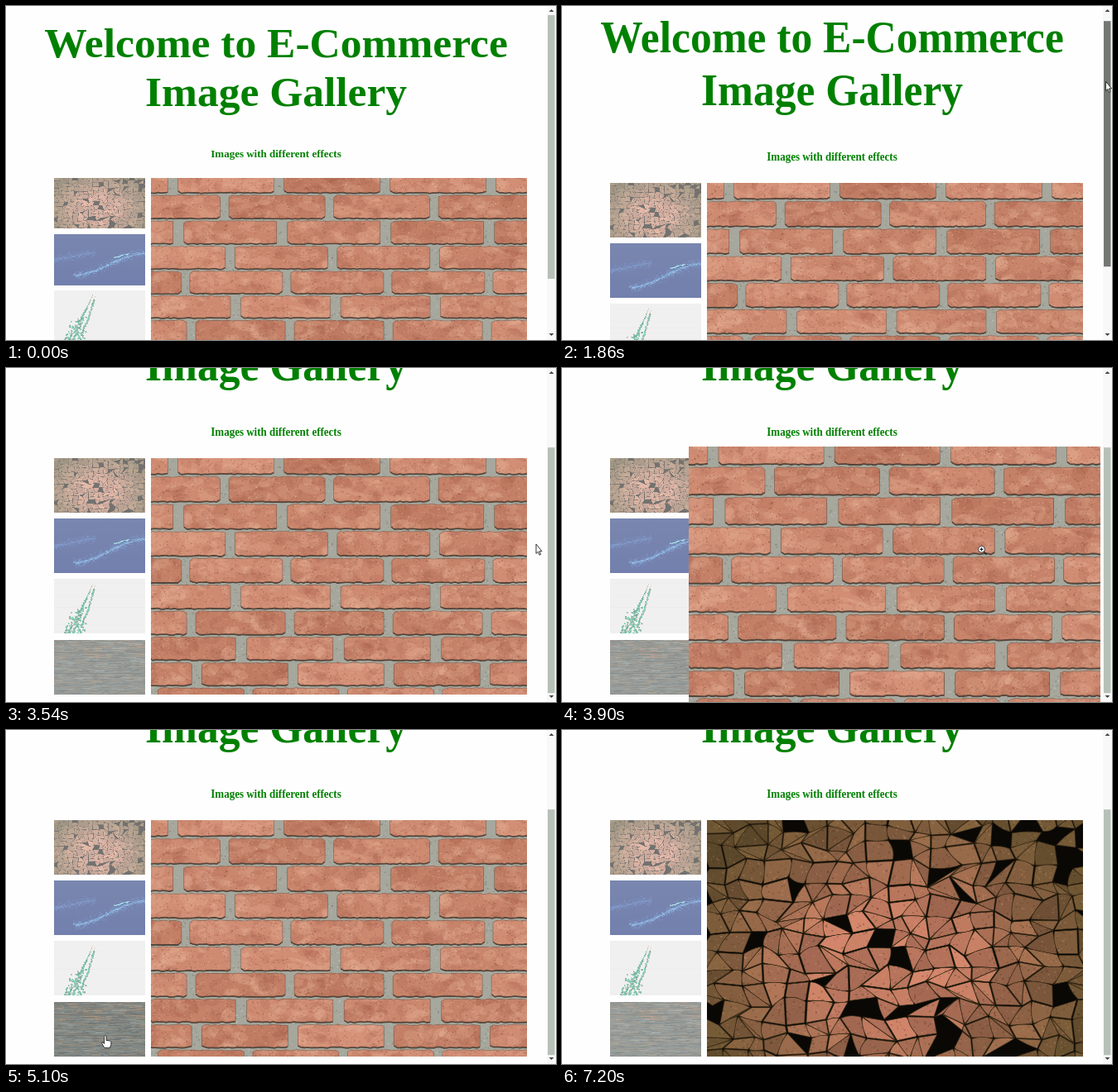
These frames come from a looping animation (664 px wide and 404 px high, 7260 ms). An HTML page with a canvas:

```html
<!DOCTYPE html>
<html lang="en">
<head>
<meta charset="utf-8">
<title>Image Gallery</title>
<style>
html, body { margin: 0; width: 100%; height: 100%; overflow: hidden; background: #fff; }
canvas { display: block; width: 664px; height: 404px; }
</style>
</head>
<body>
<canvas id="stage" width="664" height="404"></canvas>
<script>
const LOOP = 7260, W = 664, H = 404;
const IW = 454, IH = 286;
const ctx = document.getElementById('stage').getContext('2d');
const clamp = v => Math.max(0, Math.min(1, v));
const smooth = u => u * u * (3 - 2 * u);
const ramp = (t, from, ms) => smooth(clamp((t - from) / ms));
const mix = (a, b, u) => a + (b - a) * u;

function random(seed) {
  return () => {
    seed = (seed + 0x6D2B79F5) | 0;
    let n = Math.imul(seed ^ (seed >>> 15), 1 | seed);
    n = (n + Math.imul(n ^ (n >>> 7), 61 | n)) ^ n;
    return ((n ^ (n >>> 14)) >>> 0) / 4294967296;
  };
}

// Paints one picture once, at double resolution.
function picture(seed, back, paint) {
  const c = document.createElement('canvas');
  c.width = IW * 2;
  c.height = IH * 2;
  const g = c.getContext('2d');
  g.scale(2, 2);
  g.fillStyle = back;
  g.fillRect(0, 0, IW, IH);
  const rnd = random(seed);
  paint(g, (a, b) => mix(a, b, rnd()));
  return c;
}

const pick = (r, list) => list[Math.floor(r(0, list.length))];

function speckle(g, r, n, x, y, w, h, colors, size) {
  for (let i = 0; i < n; i++) {
    g.fillStyle = pick(r, colors);
    g.fillRect(r(x, x + w), r(y, y + h), r(.5, size), r(.5, size));
  }
}

function brick(g, r, x0, y0, x1, y1) {
  const top = [], low = [];
  for (let x = x0; x <= x1; x += 4) {
    const end = 2.6 * (1 - clamp(Math.min(x - x0, x1 - x) / 4));
    top.push([x, y0 + end + r(0, 1.3)]);
    low.unshift([x, y1 - end - r(0, 1.3)]);
  }
  const outline = dy => {
    g.beginPath();
    [...top, ...low].forEach(([x, y]) => g.lineTo(x, y + dy));
    g.closePath();
  };
  g.fillStyle = '#4f443b';
  outline(1.6);
  g.fill();
  g.save();
  outline(0);
  g.clip();
  const tone = r(-12, 10), w = x1 - x0, h = y1 - y0;
  g.fillStyle = `rgb(${203 + tone},${136 + tone},${111 + tone})`;
  g.fillRect(x0 - 4, y0 - 4, w + 8, h + 8);
  for (let i = 0; i < w / 5; i++) {
    g.fillStyle = r(0, 1) < .55 ? 'rgba(232,180,156,.22)' : 'rgba(158,84,62,.16)';
    g.beginPath();
    g.ellipse(r(x0, x1), r(y0, y1), r(3, 14), r(2, 9), r(-.6, .6), 0, 7);
    g.fill();
  }
  speckle(g, r, w * 2, x0, y0, w, h,
    ['rgba(120,60,46,.4)', 'rgba(240,195,172,.45)', 'rgba(170,92,70,.45)'], 1.6);
  g.restore();
  g.strokeStyle = 'rgba(105,72,54,.5)';
  g.lineWidth = .8;
  outline(0);
  g.stroke();
}

// Courses get a little lower and bricks shorter towards the bottom.
const bricks = picture(7, '#a6a79d', (g, r) => {
  speckle(g, r, 5000, 0, 0, IW, IH, ['#85877f', '#bdbeb5', '#96968a', '#b0b4ae'], 2);
  const courseTop = i => 22 + 33.6 * (i - 1) - .2 * (i - 1) ** 2;
  for (let i = 0; i < 10; i++) {
    const pitch = 128 - 1.5 * i;
    const joint = (i % 2 ? 86 : 28) + 3.6 * i;
    for (let x = joint - pitch; x < IW; x += pitch) {
      brick(g, r, x + 5, courseTop(i), x + pitch - 5, courseTop(i + 1) - 2.6);
    }
  }
});

// Split logs: a jittered mesh, some cells cut in two, reddish inside, olive at the rim.
const logs = picture(21, '#0a0805', (g, r) => {
  const mesh = [];
  for (let j = 0; j < 16; j++) {
    mesh.push([]);
    for (let i = 0; i < 20; i++) mesh[j].push([i * 25 - 8 + (j % 2) * 8 + r(-9, 9), j * 21 - 10 + r(-8, 8)]);
  }
  const log = pts => {
    const cx = pts.reduce((s, p) => s + p[0], 0) / pts.length;
    const cy = pts.reduce((s, p) => s + p[1], 0) / pts.length;
    const corner = cx > 385 && cy < 60;
    if (r(0, 1) < (corner ? .55 : .06)) return;
    const far = clamp(Math.hypot((cx - 225) / 245, (cy - 175) / 200) * 1.6 - .6);
    const k = r(.84, 1.12);
    const color = [[192, 108], [122, 84], [97, 50]].map(([a, b]) => mix(a, b, far) * k);
    const [first, ...rest] = pts.map(([x, y]) => [mix(cx, x, .92), mix(cy, y, .92)]);
    g.beginPath();
    g.moveTo(...first);
    rest.forEach(p => g.lineTo(...p));
    const last = rest[rest.length - 1];
    const mx = (first[0] + last[0]) / 2, my = (first[1] + last[1]) / 2;
    g.quadraticCurveTo(mx + (mx - cx) * .4, my + (my - cy) * .4, ...first);
    g.fillStyle = `rgb(${color})`;
    g.fill();
    g.save();
    g.clip();
    speckle(g, r, 26, cx - 14, cy - 14, 28, 28, ['rgba(60,38,22,.3)', 'rgba(225,165,130,.25)'], 2.4);
    g.restore();
    g.strokeStyle = '#3a2c18';
    g.lineWidth = .8;
    g.stroke();
  };
  for (let j = 0; j < 15; j++) {
    for (let i = 0; i < 19; i++) {
      const a = mesh[j][i], b = mesh[j][i + 1], c = mesh[j + 1][i + 1], d = mesh[j + 1][i];
      const cut = r(0, 1);
      if (cut < .22) { log([a, b, c]); log([a, c, d]); }
      else if (cut < .44) { log([b, c, d]); log([b, d, a]); }
      else log(pick(r, [[a, b, c, d], [b, c, d, a], [c, d, a, b], [d, a, b, c]]));
    }
  }
});

const sea = picture(4, '#0b2470', (g, r) => {
  const shade = g.createLinearGradient(0, 0, 0, IH);
  shade.addColorStop(0, '#152c72');
  shade.addColorStop(1, '#0a2070');
  g.fillStyle = shade;
  g.fillRect(0, 0, IW, IH);
  // A crest rises from left to right along an S shape.
  const crest = (x0, x1, y0, y1, spread, n, color) => {
    g.fillStyle = color;
    for (let i = 0; i < n; i++) {
      const u = r(0, 1);
      g.beginPath();
      g.ellipse(mix(x0, x1, u), mix(y0, y1, smooth(u)) + r(-1, 1) * r(0, spread), r(2, 9), r(.6, 2), -.3, 0, 7);
      g.fill();
    }
  };
  crest(100, IW, 232, 108, 34, 750, 'rgba(40,110,200,.3)');
  crest(0, 205, 140, 105, 28, 400, 'rgba(45,100,190,.28)');
  crest(100, IW, 232, 108, 14, 260, 'rgba(95,180,235,.35)');
  crest(300, 370, 130, 112, 4, 60, 'rgba(120,235,225,.55)');
});

const ivy = picture(12, '#e7e5e6', (g, r) => {
  for (let y = 0; y < IH; y += 7) {
    g.fillStyle = `rgba(205,203,208,${r(.05, .3)})`;
    g.fillRect(0, y, IW, 1);
  }
  const leaf = (x, y, s) => {
    g.fillStyle = 'rgba(75,65,50,.55)';
    g.beginPath();
    g.arc(x + 1.4, y + 1.6, s, 0, 7);
    g.fill();
    g.fillStyle = pick(r, ['#16946c', '#0f7a59', '#2bb083', '#1d9f78']);
    g.beginPath();
    g.ellipse(x, y, s, s * r(.75, 1), r(0, 3), 0, 7);
    g.fill();
    g.fillStyle = 'rgba(130,220,175,.5)';
    g.beginPath();
    g.arc(x - s * .3, y - s * .3, s * .35, 0, 7);
    g.fill();
  };
  const stem = (x0, y0, x1) => {
    const at = y => {
      const u = (y - y0) / (292 - y0);
      return mix(x0, x1, u) + 20 * u * (1 - u);
    };
    g.strokeStyle = '#7a6a4c';
    g.lineWidth = 1.2;
    g.beginPath();
    for (let y = y0; y < IH; y += 10) g.lineTo(at(y), y);
    g.stroke();
    for (let y = y0; y < IH; y += mix(11, 5, y / IH)) {
      const spread = 2 + Math.max(0, y - 120) * .06;
      if (y > 48) leaf(at(y) + r(-spread, spread), y, r(3.6, 5.8));
      else {
        g.fillStyle = '#b29a62';
        g.beginPath();
        g.ellipse(at(y) + r(-3, 3), y, 2, 2.8, .5, 0, 7);
        g.fill();
      }
    }
  };
  stem(194, 25, 68);
  stem(205, 36, 120);
  stem(150, 125, 92);
  for (let i = 0; i < 62; i++) {
    const up = r(0, 1) ** 1.4;
    leaf(mix(95, 130, up) + r(-1, 1) * mix(58, 36, up), mix(IH, 150, up), r(3.2, 5.6));
  }
});

const planks = picture(33, '#46504c', (g, r) => {
  const colors = ['#2f3b3a', '#5d6963', '#4d4c40', '#737a72', '#76583a', '#273030'];
  for (let i = 0; i < 2600; i++) {
    const y = r(0, IH);
    g.globalAlpha = r(.3, .8);
    g.fillStyle = y < 100 && r(0, 1) < .18 ? '#a3673f' : pick(r, colors);
    g.fillRect(r(-50, IW), y, r(12, 75), r(.8, 3));
  }
  g.globalAlpha = .6;
  g.fillStyle = '#252c2a';
  for (let y = 32; y < IH; y += 36) g.fillRect(0, y, IW, 1.6);
});

const THUMBS = [logs, sea, ivy, planks];
const RESIZE = 240, STRETCH = 1.075;
const DRAG = 1580, DRAG_MS = 1570, SCROLL_MAX = 114.6;
const ENTER = 3640, LEAVE = 4800, ZOOM_MS = 300;

// Thumbnails are clicked from the last to the first at an even pace.
const CLICK = 5220, STEP = 520;
const clickTime = i => CLICK + (3 - i) * STEP;
const hover = (t, i) => ramp(t, clickTime(i) - 150, 90) - ramp(t, clickTime(i) + 330, 90);

function shown(t) {
  return t < CLICK ? bricks : THUMBS[Math.max(0, 3 - Math.floor((t - CLICK) / STEP))];
}

const PATH = [
  [700, 560, 420], [DRAG, 656, 84], [DRAG + DRAG_MS, 662, 169],
  [3540, 640, 213], [4240, 385, 225], [4500, 385, 225]
];
for (let i = 3; i >= 0; i--) {
  const y = 152 + i * 73;
  PATH.push([clickTime(i) - 80, 117, y], [clickTime(i) + 260, 117, y]);
}
PATH.push([7140, 105, -20]);

function cursorAt(t) {
  const next = PATH.findIndex(k => k[0] > t);
  if (next < 1) return PATH[next < 0 ? PATH.length - 1 : 0].slice(1);
  const [t0, x0, y0] = PATH[next - 1], [t1, x1, y1] = PATH[next];
  const u = ramp(t, t0, t1 - t0);
  return [mix(x0, x1, u), mix(y0, y1, u)];
}

function text(str, y, size) {
  ctx.font = `bold ${size}px "Liberation Serif", "Times New Roman", serif`;
  ctx.fillText(str, 326, y);
}

function page(t, scroll, zoom) {
  ctx.save();
  ctx.translate(0, -scroll);
  if (t >= RESIZE) ctx.scale(1, STRETCH);
  ctx.fillStyle = '#008000';
  ctx.textAlign = 'center';
  text('Welcome to E-Commerce', 61.5, 51.5);
  text('Image Gallery', 120.5, 51.5);
  text('Images with different effects', 182.7, 13);
  THUMBS.forEach((img, i) => {
    ctx.globalAlpha = mix(.57, 1, hover(t, i));
    ctx.drawImage(img, 57.6, 208 + i * 68.1, 110.4, 61.4);
  });
  ctx.globalAlpha = 1;
  const w = IW * zoom, h = 265.6 * zoom;
  ctx.drawImage(shown(t), 401.5 - w / 2, 340.8 - h / 2, w, h);
  ctx.restore();
}

function scrollbar(t, scroll) {
  const drag = t > DRAG - 60 && t < DRAG + DRAG_MS + 60;
  ctx.fillStyle = '#f7f8f7';
  ctx.fillRect(653, 0, 11, H);
  ctx.fillStyle = drag ? '#737872' : '#b7c0b8';
  ctx.fillRect(654, 11 + scroll * .743, 8.5, t < RESIZE ? 319 : 297);
  ctx.fillStyle = '#444';
  for (const [y, d] of [[7, -3], [396, 3]]) {
    ctx.beginPath();
    ctx.moveTo(655.5, y);
    ctx.lineTo(661.5, y);
    ctx.lineTo(658.5, y + d);
    ctx.fill();
  }
}

const ARROW = new Path2D('M0 0V11.5L2.4 9.2L4 13.2L5.6 12.5L4 8.7H7Z');
const HAND = new Path2D('M-1.2 1Q0 -1 1.2 1V6L5.4 6.4L7 8V11L5.5 15H-1L-4 10Q-4.5 8 -2.6 8.6L-1.2 10Z');
const LENS = new Path2D('M-2 0H2M0 -2V2M3 3L6 6.5');

function cursor(x, y, zoom, scroll) {
  const inMain = Math.abs(x - 401.5) < 227 * zoom && Math.abs(y + scroll - 366.4) < 142.8 * zoom;
  const row = (y + scroll - 223.6) / 73.2;
  const inThumb = x > 58 && x < 168 && row >= 0 && row < 4 && row % 1 < .9;
  ctx.save();
  ctx.translate(x, y);
  ctx.fillStyle = '#fff';
  ctx.strokeStyle = '#222';
  ctx.lineWidth = .9;
  if (inMain) {
    ctx.beginPath();
    ctx.arc(0, 0, 4, 0, 7);
    ctx.fill();
    ctx.stroke();
    ctx.lineWidth = 1.3;
    ctx.stroke(LENS);
  } else {
    const shape = inThumb ? HAND : ARROW;
    ctx.fill(shape);
    ctx.stroke(shape);
  }
  ctx.restore();
}

function draw(now) {
  const t = now % LOOP;
  const scroll = SCROLL_MAX * ramp(t, DRAG, DRAG_MS);
  const zoom = 1 + .1 * (ramp(t, ENTER, ZOOM_MS) - ramp(t, LEAVE, ZOOM_MS));
  ctx.fillStyle = '#fefefe';
  ctx.fillRect(0, 0, W, H);
  page(t, scroll, zoom);
  scrollbar(t, scroll);
  cursor(...cursorAt(t), zoom, scroll);
}

const start = performance.now();
function tick() {
  draw(performance.now() - start);
  requestAnimationFrame(tick);
}
tick();
</script>
</body>
</html>
```
